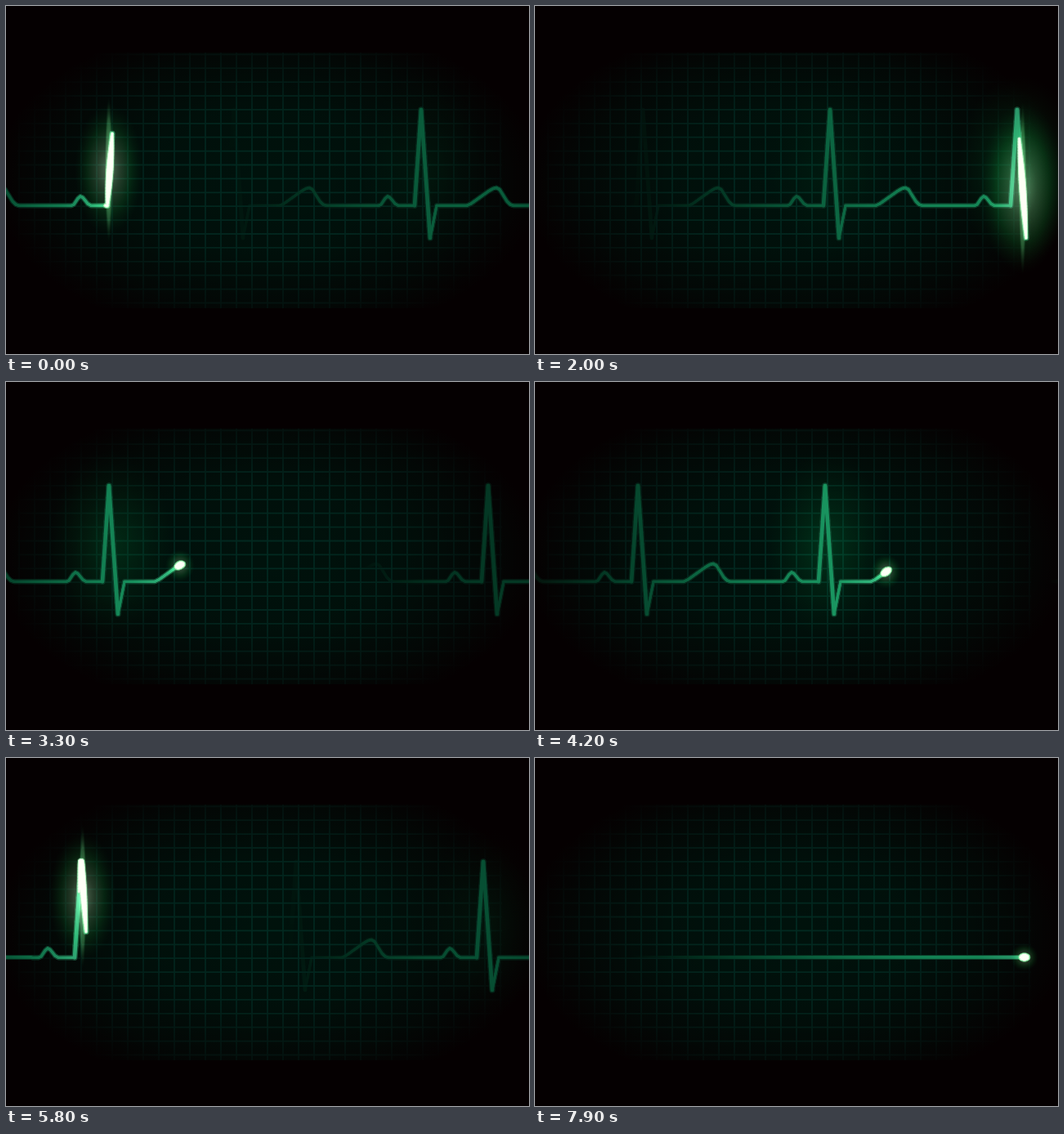
Recreate the animation shown at these times as an HTML page with a canvas. Size 640x426 px, loop 8000 ms.

```html
<!DOCTYPE html>
<html lang="en">
<head>
<meta charset="utf-8">
<title>Heart monitor</title>
<style>
  html, body { margin: 0; width: 100%; height: 100%; overflow: hidden; background: #050001; }
  canvas { display: block; width: 100vw; height: 100vh; }
</style>
</head>
<body>
<canvas id="stage" width="640" height="426"></canvas>
<script>
const W = 640, H = 426, LOOP = 8000, STEP = 100;
const BASE = 244.3, PERIOD = 229, FADE = 2.1, STREAK = 8.5;
const ctx = document.getElementById('stage').getContext('2d');

// One heartbeat: offset from the tall peak, height on screen
const BEAT = [
  [-52, BASE], [-49, 243], [-44, 235.5], [-41, 233], [-38, 234.5], [-32, 242], [-28, BASE],
  [-8, BASE], [0, 127], [11, 284], [19, BASE],
  [56, BASE], [61, 242], [82, 227], [88, 223.5], [92, 222.5], [96, 224.5],
  [105, 239], [109, 243], [113, BASE]
];

// Each pass across the screen: first peak, and head position over time in seconds
const SWEEPS = [
  { peak: 279, head: t => 750 + 240 * t },
  { peak: 132, head: t => 130 + 231 * Math.min(t, 1) + 240 * Math.max(t - 1, 0) },
  { peak: 126, head: t => 217 + 241 * (t - 3.3) },
  { peak: 92, head: t => 98 + 240.5 * (t - 5.8), last: true }
];

function beatY(d) {
  for (let i = 1; i < BEAT.length; i++) {
    const [x0, y0] = BEAT[i - 1], [x1, y1] = BEAT[i];
    if (d >= x0 && d <= x1) return y0 + (y1 - y0) * (d - x0) / (x1 - x0);
  }
  return BASE;
}

function traceY(sweep, x) {
  const d = x - sweep.peak;
  if (sweep.last && (d > 19 || d < -60)) return BASE - 0.4;
  return beatY((d + 116 + 4 * PERIOD) % PERIOD - 116);
}

// Soft elliptical light; stops are [offset, colour]
function glow(x, y, rx, ry, stops) {
  ctx.save();
  ctx.translate(x, y);
  ctx.scale(rx, ry);
  const g = ctx.createRadialGradient(0, 0, 0, 0, 0, 1);
  stops.forEach(s => g.addColorStop(s[0], s[1]));
  ctx.fillStyle = g;
  ctx.fillRect(-1, -1, 2, 2);
  ctx.restore();
}

function line(x0, y0, x1, y1, width, color) {
  ctx.strokeStyle = color;
  ctx.lineWidth = width;
  ctx.beginPath();
  ctx.moveTo(x0, y0);
  ctx.lineTo(x1, y1);
  ctx.stroke();
}

function drawScreen() {
  ctx.globalCompositeOperation = 'source-over';
  ctx.lineCap = 'butt';
  ctx.fillStyle = '#050001';
  ctx.fillRect(0, 0, W, H);
  ctx.fillStyle = 'rgb(0,18,12)';
  ctx.fillRect(0, 57, W, 313);
  for (let x = 16; x < 610; x += 19) line(x, 57, x, 370, 1.8, 'rgb(2,42,33)');
  for (let y = 59.3; y < 370; y += 16.9) line(14, y, 607, y, 1.8, 'rgb(2,42,33)');
  ctx.save();
  ctx.translate(320, 213);
  ctx.scale(310, 185);
  const g = ctx.createRadialGradient(0, 0, 0, 0, 0, 1.08);
  g.addColorStop(0, 'rgba(5,0,1,0)');
  g.addColorStop(0.45, 'rgba(5,0,1,.15)');
  g.addColorStop(0.78, 'rgba(5,0,1,.58)');
  g.addColorStop(1, 'rgba(5,0,1,1)');
  ctx.fillStyle = g;
  ctx.fillRect(-1.1, -1.2, 2.2, 2.4);
  ctx.restore();
}

function drawBeatGlow(sweep, head) {
  ctx.globalCompositeOperation = 'lighter';
  for (let p = sweep.peak; p < W && p + 10 < head; p += PERIOD) {
    const a = 1 - (head - p) / 240 / 1.3;
    if (a > 0) glow(p + 3, 200, 75, 115, [
      [0, `rgba(0,60,26,${0.75 * a})`],
      [0.5, `rgba(0,45,18,${0.4 * a})`],
      [1, 'rgba(0,30,10,0)']
    ]);
    if (sweep.last) break;
  }
}

function drawTrail(sweep, head) {
  ctx.globalCompositeOperation = 'lighten';
  ctx.lineCap = 'round';
  const end = Math.min(W + 4, head);
  for (let x = Math.max(-4, Math.floor(head - FADE * 240)); x < end; x++) {
    const next = Math.min(x + 1, end);
    const y0 = traceY(sweep, x), y1 = traceY(sweep, next);
    const age = Math.max(0, (head - x) / 240);
    const edge = 1 - 0.4 * Math.abs((x - 320) / 320) ** 3;
    const f = Math.max(0, 1 - age / FADE) ** 0.8 * edge;
    const hot = Math.max(0, 1 - age / 0.25) * 30;
    const width = Math.abs(y1 - y0) > 5 ? 5.6 : 4.2;
    const tone = k => `rgb(${k * (32 * f * f + hot)},${k * (168 * f + hot)},${k * (108 * f + hot)})`;
    line(x, y0, next, y1, width + 1.6, tone(0.45));
    line(x, y0, next, y1, width - 1, tone(1));
  }
}

// Points along the freshly lit stretch, evenly spaced in x
function streakPoints(sweep, head) {
  const pts = [];
  let len = 0;
  for (let i = 0; i <= 34; i++) {
    const x = head - STREAK * (1 - i / 34), y = traceY(sweep, x);
    if (i) len += Math.hypot(x - pts[i - 1].x, y - pts[i - 1].y);
    pts.push({ x, y, len });
  }
  return pts;
}

function drawHead(sweep, head) {
  if (head < -20 || head - STREAK > W + 20) return;
  const pts = streakPoints(sweep, head), len = pts[34].len;
  const ys = pts.map(p => p.y);
  const top = Math.min(...ys), bottom = Math.max(...ys);
  const cx = head - STREAK / 2, cy = (top + bottom) / 2, tall = bottom - top;
  const power = Math.min(1, len / 110);

  ctx.globalCompositeOperation = 'lighter';
  glow(cx, cy, 17 + tall * 0.28, 17 + tall * 0.72, [
    [0, `rgba(115,135,110,${0.45 + 0.3 * power})`],
    [0.35, 'rgba(60,85,58,.55)'],
    [0.65, 'rgba(8,50,18,.5)'],
    [1, 'rgba(0,25,8,0)']
  ]);
  if (tall > 40) glow(cx, cy, 5, tall / 2 + 45, [
    [0, 'rgba(120,190,130,.6)'], [0.7, 'rgba(60,110,70,.5)'], [1, 'rgba(0,40,15,0)']
  ]);

  ctx.globalCompositeOperation = 'source-over';
  ctx.lineCap = 'round';
  const layers = [[4, 'rgba(120,220,140,.16)'], [1.5, 'rgb(190,245,200)'], [-0.5, 'rgb(253,255,246)']];
  for (const [extra, color] of layers) {
    for (let i = 1; i < pts.length; i++) {
      const a = pts[i - 1], b = pts[i];
      const u = (a.len + b.len) / 2 / len;
      line(a.x, a.y, b.x, b.y, Math.max(1, 2.5 + 5 * Math.sin(Math.PI * u) + extra), color);
    }
  }
}

function draw(ms) {
  const t = Math.floor(ms % LOOP / STEP) * STEP / 1000;
  drawScreen();
  for (const sweep of SWEEPS) {
    const head = sweep.head(t);
    if (head < -20 || head > W + FADE * 240) continue;
    drawBeatGlow(sweep, head);
    drawTrail(sweep, head);
    drawHead(sweep, head);
  }
}

const start = performance.now();
function tick() {
  draw(performance.now() - start);
  requestAnimationFrame(tick);
}
tick();
</script>
</body>
</html>
```
